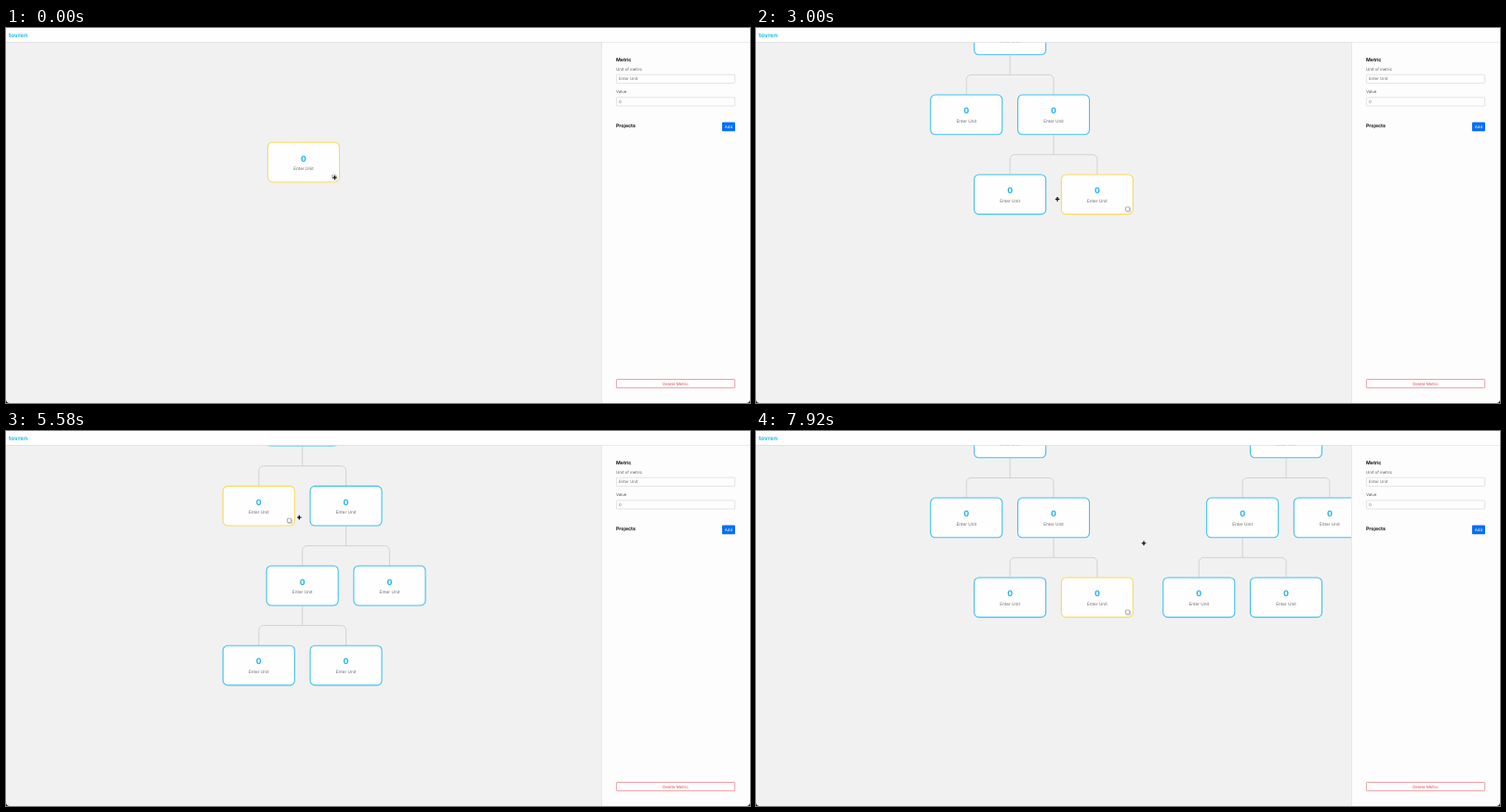
These frames come from a looping animation (800x404 px, 8000 ms). An HTML page with a canvas:

```html
<!DOCTYPE html>
<html lang="en">
<head>
<meta charset="utf-8">
<title>Metric tree</title>
<style>
  html, body { margin: 0; width: 100%; height: 100%; overflow: hidden; background: #f1f1f1; }
  canvas { display: block; width: 800px; height: 404px; }
</style>
</head>
<body>
<canvas id="stage"></canvas>
<script>
const W = 800, H = 404, LOOP = 8000, FPS = 12;
const BLUE = '#3fc1f0', YELLOW = '#fcd95c', FONT = 'Inter, "Open Sans", sans-serif';

// The page is 2560 px wide, shown at 800.
const S = W / 2560;
const CARD_W = 250 * S, CARD_H = 140 * S, BORDER = 3.5 * S;
const HALF = 150 * S, COUSIN = 350 * S, ROW = 275 * S;
const FOCUS = { x: 320, y: 93.4 }, START_Y = 144.6, GLIDE = 500;

const canvas = document.getElementById('stage');
const ctx = canvas.getContext('2d');
const dpr = window.devicePixelRatio || 1;
canvas.width = W * dpr;
canvas.height = H * dpr;

// Nodes are paths of L/R turns. "add" splits a node, "pick" selects it.
const addSpot = [33.5, 16.5], pickSpot = [-9, -4];
const actions = [
  { t: 830, kind: 'add', node: '', spot: addSpot, hold: 830 },
  { t: 2080, kind: 'add', node: 'R', spot: addSpot, hold: 0 },
  { t: 3330, kind: 'pick', node: 'RL', spot: pickSpot, hold: 100 },
  { t: 4080, kind: 'add', node: 'RL', spot: addSpot, hold: 200 },
  { t: 5330, kind: 'pick', node: 'L', spot: pickSpot, hold: 600 },
  { t: 5580, kind: 'hover', node: 'L', spot: [43.5, 12.5], hold: 0 },
  { t: 6160, kind: 'add', node: 'L', spot: addSpot, hold: 300 },
  { t: 7660, kind: 'add', node: 'LR', spot: addSpot, hold: 500 },
  { t: 7910, kind: 'hover', node: 'LR', spot: [97, 27.5], hold: 0 }
];

const mix = (a, b, u) => a + (b - a) * u;
function ease(t, from, to) {
  const u = Math.min(1, Math.max(0, (t - from) / (to - from)));
  return u * u * (3 - 2 * u);
}

const sway = turns => [...turns].reduce((x, c) => x + (c === 'L' ? -HALF : HALF), 0);

// Push the root's branches apart until cousins on each row keep their distance.
function rootHalf(nodes) {
  let gap = 2 * HALF;
  for (const a of nodes) for (const b of nodes) {
    if (a[0] === 'L' && b[0] === 'R' && a.length === b.length && a.length > 1) {
      gap = Math.max(gap, sway(a.slice(1)) - sway(b.slice(1)) + COUSIN);
    }
  }
  return gap / 2;
}

function sceneAt(t) {
  const open = [];
  let selected = '';
  for (const { kind, node } of actions.filter(a => a.t <= t)) {
    if (kind === 'add') { open.push(node); selected = node + 'R'; }
    if (kind === 'pick') selected = node;
  }
  const nodes = ['', ...open.flatMap(p => [p + 'L', p + 'R'])];
  const half = rootHalf(nodes);
  const local = p => [p ? Math.sign(sway(p[0])) * half + sway(p.slice(1)) : 0, p.length * ROW];

  const active = open.at(-1) ?? '';
  const [ax, ay] = local(active);
  let x = FOCUS.x - ax;
  let y = (open.length ? mix(START_Y - ROW, FOCUS.y, ease(t, 830, 1000)) : START_Y) - ay;
  if (active === 'RL') {
    x -= 1.3 * ease(t, 4250, 5250);
    y += 73.2 * ease(t, 4790, 5330);
  }
  const place = p => {
    const [px, py] = local(p);
    return [px + x, py + y];
  };
  return { nodes, open, selected, place };
}

// Where the pointer stands for each action, in the view just before it.
const stops = actions.map(({ t, node, spot, hold }, i) => {
  const [x, y] = sceneAt(t - 1).place(node);
  const end = t - hold;
  const start = Math.max(end - GLIDE, i ? actions[i - 1].t : 0);
  return { x: x + spot[0], y: y + spot[1], start, end };
});

function pointerAt(t) {
  let { x, y } = stops[0];
  for (const s of stops.slice(1)) {
    const u = ease(t, s.start, s.end);
    x = mix(x, s.x, u);
    y = mix(y, s.y, u);
  }
  return [x, y];
}

function text(str, x, y, size, color, weight = 400, align = 'left') {
  ctx.font = `${weight} ${size}px ${FONT}`;
  ctx.fillStyle = color;
  ctx.textAlign = align;
  ctx.fillText(str, x, y);
}

function box(x, y, w, h, r, fill, stroke, line = 1) {
  ctx.beginPath();
  ctx.roundRect(x, y, w, h, r);
  if (fill) { ctx.fillStyle = fill; ctx.fill(); }
  if (stroke) { ctx.strokeStyle = stroke; ctx.lineWidth = line; ctx.stroke(); }
}

function branch([px, py], [lx, ly], [rx]) {
  const mid = py + ROW / 2, bottom = ly - CARD_H / 2;
  ctx.beginPath();
  ctx.moveTo(px, py + CARD_H / 2);
  ctx.lineTo(px, mid);
  ctx.moveTo(lx, bottom);
  ctx.arcTo(lx, mid, px, mid, 5);
  ctx.arcTo(rx, mid, rx, bottom, 5);
  ctx.lineTo(rx, bottom);
  ctx.strokeStyle = '#cfcfcf';
  ctx.lineWidth = 0.9;
  ctx.stroke();
}

function copyIcon(x, y) {
  box(x - 1.4, y - 1.4, 4.2, 4.2, 0.5, null, '#a4a4a4', 0.6);
  box(x - 2.4, y - 2.4, 4.2, 4.2, 0.5, '#fefefe', '#8a8a8a', 0.7);
}

function card([x, y], selected) {
  const w = CARD_W - BORDER, h = CARD_H - BORDER;
  box(x - w / 2, y - h / 2, w, h, 5, '#fefefe', selected ? YELLOW : BLUE, BORDER);
  text('0', x, y - 1.1, 28 * S, '#1db1ee', 700, 'center');
  text('Enter Unit', x, y + 8.5, 15 * S, '#6b6b6b', 400, 'center');
  if (selected) copyIcon(x + 33, y + 16);
}

function drawTree({ nodes, open, selected, place }) {
  open.forEach(p => branch(place(p), place(p + 'L'), place(p + 'R')));
  nodes.forEach(p => card(place(p), p === selected));
}

function drawHeader() {
  ctx.fillStyle = '#fefefe';
  ctx.fillRect(0, 0, W, 15);
  ctx.fillStyle = '#dedede';
  ctx.fillRect(0, 15, W, 0.7);
  text('tovren', 3, 10, 6.4, '#25b8f0', 700);
}

function field(label, value, y) {
  text(label, 656, y, 14 * S, '#555');
  box(656.4, y + 4.6, 127.3, 9.2, 0.8, '#fefefe', '#d2d2d2', 0.6);
  text(value, 659, y + 10.7, 14 * S, '#666');
}

function drawSidebar() {
  ctx.fillStyle = '#fdfdfd';
  ctx.fillRect(640, 15.7, 160, H);
  ctx.fillStyle = '#dedede';
  ctx.fillRect(640, 15, 0.7, H);
  text('Metric', 656, 36.4, 5.2, '#111', 700);
  field('Unit of metric', 'Enter Unit', 45.6);
  field('Value', '0', 70.2);
  text('Projects', 656, 106.8, 5.2, '#111', 700);
  box(770, 101.5, 14, 9.8, 0.8, '#066ff8');
  text('Add', 777, 108.1, 14 * S, '#fff', 400, 'center');
  box(656.4, 378.5, 127.3, 9.2, 0.8, '#fefefe', '#e0606c', 0.6);
  text('Delete Metric', 720, 384.7, 14 * S, '#dc4856', 400, 'center');
}

function drawCorners() {
  ctx.beginPath();
  ctx.rect(0, 0, W, H);
  ctx.roundRect(0, -10, W, H + 10, 4);
  ctx.fillStyle = '#111';
  ctx.fill('evenodd');
}

function drawPointer([x, y]) {
  for (const [color, width, r] of [['#fff', 2.6, 2.8], ['#111', 1.4, 2.3]]) {
    ctx.beginPath();
    ctx.moveTo(x - r, y);
    ctx.lineTo(x + r, y);
    ctx.moveTo(x, y - r);
    ctx.lineTo(x, y + r);
    ctx.strokeStyle = color;
    ctx.lineWidth = width;
    ctx.stroke();
  }
}

function draw(t) {
  ctx.setTransform(dpr, 0, 0, dpr, 0, 0);
  ctx.textRendering = 'geometricPrecision';
  ctx.fillStyle = '#f1f1f1';
  ctx.fillRect(0, 0, W, H);
  drawTree(sceneAt(t));
  drawHeader();
  drawSidebar();
  drawCorners();
  drawPointer(pointerAt(t));
}

const start = performance.now();
function tick() {
  const t = (performance.now() - start) % LOOP;
  // The picture advances in whole steps of 1/12 s.
  const step = Math.floor((t + 7) * FPS / 1000) % (LOOP * FPS / 1000);
  draw(step * 1000 / FPS);
  requestAnimationFrame(tick);
}
tick();
</script>
</body>
</html>
```
